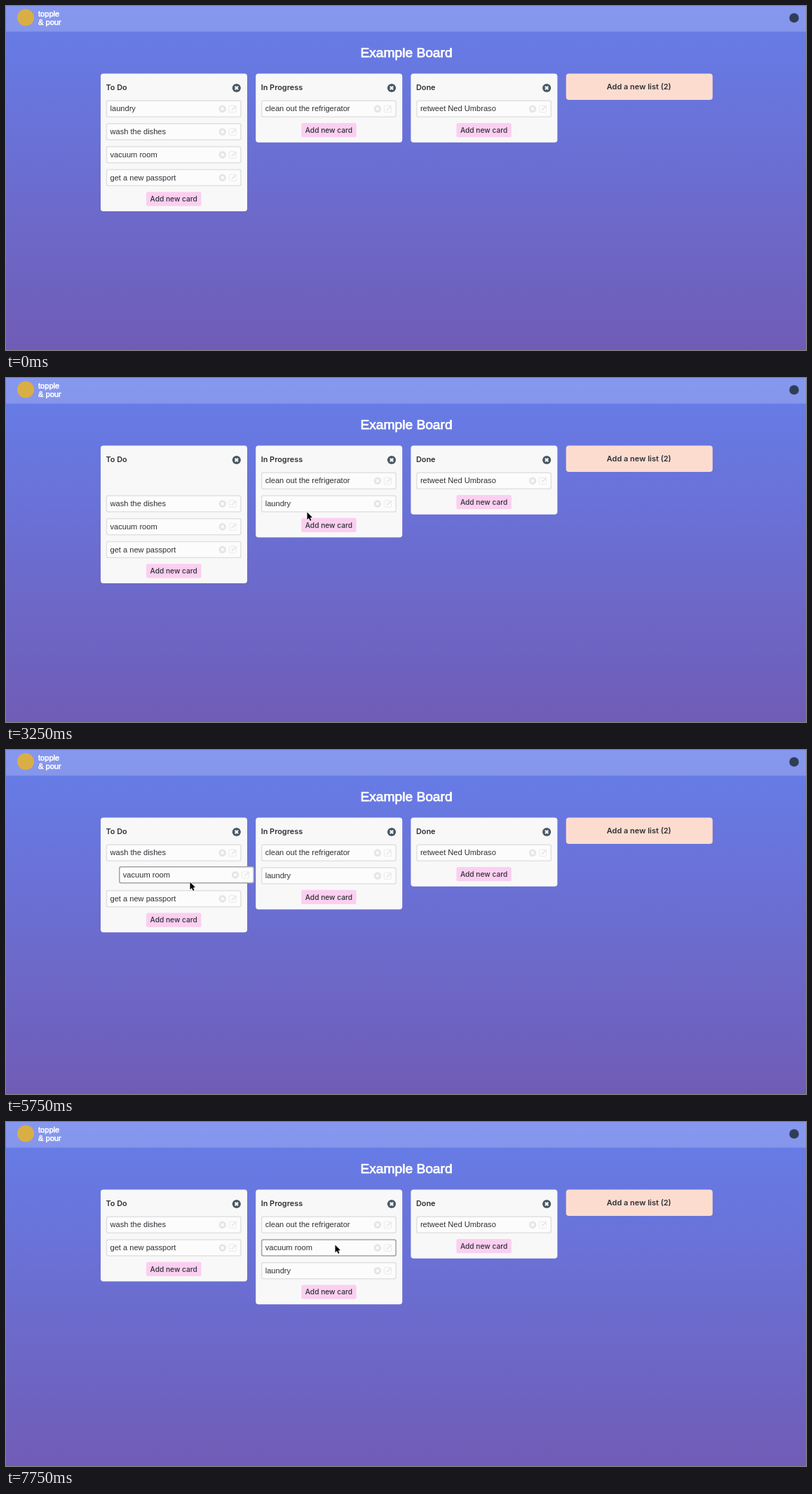
An HTML page with a canvas that plays this animation: 1141 by 491 pixels, repeating every 8000 ms.

```html
<!DOCTYPE html>
<html lang="en">
<head>
<meta charset="utf-8">
<title>Example Board</title>
<style>
  html, body { margin: 0; width: 100%; height: 100%; overflow: hidden; background: #6b6ed0; }
  canvas { display: block; width: 1141px; height: 491px; }
</style>
</head>
<body>
<canvas id="stage"></canvas>
<script>
const W = 1141, H = 491, LOOP = 8000, STEP = 250;
const canvas = document.getElementById('stage');
const ctx = canvas.getContext('2d');
const dpr = window.devicePixelRatio || 1;
canvas.width = W * dpr;
canvas.height = H * dpr;

const SANS = '"Liberation Sans", Arial, sans-serif';
const UI = 'Inter, sans-serif';
const INK = '#2d3035';
const LIST_W = 209, LIST_TOP = 96.5;
const CARD_W = 193, CARD_H = 24.5, CARD_TOP = 134.4, PITCH = 32.75;

const LAUNDRY = 'laundry', WASH = 'wash the dishes', VACUUM = 'vacuum room';
const PASSPORT = 'get a new passport', CLEAN = 'clean out the refrigerator';

// Pointer position per step, starting at FIRST
const FIRST = 3;
const path = [
  [330, 87], [290, 126], [264, 152], [262, 156], [261, 157],
  [265, 157], [288, 160], [322, 165], [378, 178], [425, 190],
  [429, 191], [427, 191], [395, 184], [300, 172], [232, 165],
  [227, 158], [227, 158], [229, 163], [238, 179], [244, 189],
  [262, 188], [342, 187], [411, 188], [455, 189], [464, 189],
  [465, 187], [467, 180], [469, 175], [469, 175]
];

const drags = [
  { name: LAUNDRY, from: 8, to: 12, grab: [118, 23] },
  { name: VACUUM, from: 23, to: 26, grab: [101, 22] }
];
const hovers = [
  { name: LAUNDRY, from: 6, to: 7 },
  { name: WASH, from: 18, to: 20 },
  { name: VACUUM, from: 21, to: 22 },
  { name: VACUUM, from: 29, to: 31 }
];
const during = s => r => s >= r.from && s <= r.to;

// Card order at a step; null is an empty slot
function todoCards(s) {
  if (s < 8) return [LAUNDRY, WASH, VACUUM, PASSPORT];
  if (s < 14) return [null, WASH, VACUUM, PASSPORT];
  if (s < 23) return [WASH, VACUUM, PASSPORT];
  if (s < 28) return [WASH, null, PASSPORT];
  return [WASH, PASSPORT];
}

function progressCards(s) {
  if (s < 12) return [CLEAN];
  if (s < 13) return [CLEAN, null];
  if (s < 25) return [CLEAN, LAUNDRY];
  if (s < 27) return [CLEAN, null, LAUNDRY];
  return [CLEAN, VACUUM, LAUNDRY];
}

function box(x, y, w, h, r, fill) {
  ctx.beginPath();
  ctx.roundRect(x, y, w, h, r);
  ctx.fillStyle = fill;
  ctx.fill();
}

function disc(x, y, r, fill) {
  ctx.beginPath();
  ctx.arc(x, y, r, 0, Math.PI * 2);
  ctx.fillStyle = fill;
  ctx.fill();
}

function text(str, x, y, font, color = INK, align = 'left') {
  ctx.font = font;
  ctx.textAlign = align;
  ctx.fillStyle = color;
  ctx.fillText(str, x, y);
}

function boldText(str, x, y, size, align, weight) {
  text(str, x, y, `${size}px ${SANS}`, '#fff', align);
  ctx.strokeStyle = '#fff';
  ctx.lineWidth = weight;
  ctx.lineJoin = 'round';
  ctx.strokeText(str, x, y);
}

function line(color, width, ...pts) {
  ctx.beginPath();
  pts.forEach(([x, y]) => ctx.lineTo(x, y));
  ctx.strokeStyle = color;
  ctx.lineWidth = width;
  ctx.stroke();
}

function closeIcon(x, y, r, color, cross) {
  const d = r * 0.36;
  disc(x, y, r, color);
  line(cross, r * 0.36, [x - d, y - d], [x + d, y + d]);
  line(cross, r * 0.36, [x - d, y + d], [x + d, y - d]);
}

function editIcon(x, y, color) {
  ctx.beginPath();
  ctx.roundRect(x - 5.5, y - 4.5, 10, 9.5, 1.5);
  ctx.strokeStyle = color;
  ctx.lineWidth = 0.9;
  ctx.stroke();
  line(color, 2, [x - 2, y + 2], [x + 4.5, y - 4]);
}

function card(name, x, y, dark) {
  box(x, y, CARD_W, CARD_H, 3, dark ? '#a3a3a3' : '#e1e1e1');
  box(x + 1.5, y + 1.5, CARD_W - 3, CARD_H - 3, 2, '#fcfcfc');
  text(name, x + 5.8, y + 16, `11.1px ${SANS}`);
  closeIcon(x + 166, y + 12.3, 5.2, '#e5e5e5', '#fcfcfc');
  editIcon(x + 181, y + 12.3, '#e9e9e9');
}

function list(title, x, cards, hot) {
  const end = CARD_TOP + PITCH * cards.length;
  box(x, LIST_TOP, LIST_W, end + 27.6 - LIST_TOP, 4, '#f8f8f8');
  text(title, x + 7.5, 120, `600 10.9px ${UI}`);
  closeIcon(x + 193.8, 117, 6.1, '#495863', '#f8f8f8');
  cards.forEach((name, i) => {
    if (name) card(name, x + 7.7, CARD_TOP + PITCH * i, name === hot);
  });
  box(x + 65, end - 0.2, 78.5, 20.3, 2.5, '#fbcff0');
  text('Add new card', x + LIST_W / 2 - 0.3, end + 13.7, `500 10.2px ${UI}`, INK, 'center');
}

function pointer(x, y) {
  const pts = [[0, 0], [0, 10.8], [2.5, 8.5], [4.3, 12.4], [6, 11.6], [4.3, 7.9], [7.5, 7.6]];
  ctx.beginPath();
  pts.forEach(([dx, dy]) => ctx.lineTo(x + dx, y + dy));
  ctx.closePath();
  ctx.strokeStyle = '#fff';
  ctx.lineWidth = 1.6;
  ctx.lineJoin = 'round';
  ctx.stroke();
  ctx.fillStyle = '#000';
  ctx.fill();
}

function backdrop() {
  const sky = ctx.createLinearGradient(0, 0, 0, H);
  sky.addColorStop(0, '#667eea');
  sky.addColorStop(1, '#705cb6');
  ctx.fillStyle = sky;
  ctx.fillRect(0, 0, W, H);
  ctx.fillStyle = 'rgba(255,255,255,0.2)';
  ctx.fillRect(0, 0, W, 36.6);
  disc(28, 16.5, 12, '#d9ae45');
  boldText('topple', 46, 15.3, 11.1, 'left', 0.55);
  boldText('& pour', 46, 27.3, 11.1, 'left', 0.55);
  disc(1124, 17, 6.8, '#2f3d56');
  boldText('Example Board', 571, 73.3, 19.2, 'center', 0.75);
}

function draw(s) {
  const active = during(s);
  const hover = hovers.find(active);
  const drag = drags.find(active);
  const hot = hover && hover.name;
  const at = path[s - FIRST];

  ctx.setTransform(dpr, 0, 0, dpr, 0, 0);
  backdrop();
  list('To Do', 135, todoCards(s), hot);
  list('In Progress', 356.2, progressCards(s), hot);
  list('Done', 577.4, ['retweet Ned Umbraso'], hot);
  box(798.8, LIST_TOP, LIST_W, 37.5, 4, '#fddcd0');
  text('Add a new list (2)', 902.7, 119.3, `600 11px ${UI}`, INK, 'center');

  if (drag) card(drag.name, at[0] - drag.grab[0], at[1] - drag.grab[1], true);
  if (at) pointer(at[0] + 0.5, at[1] + 0.5);
}

const start = performance.now();
function tick() {
  draw(Math.floor(((performance.now() - start) % LOOP) / STEP));
  requestAnimationFrame(tick);
}
tick();
</script>
</body>
</html>
```
